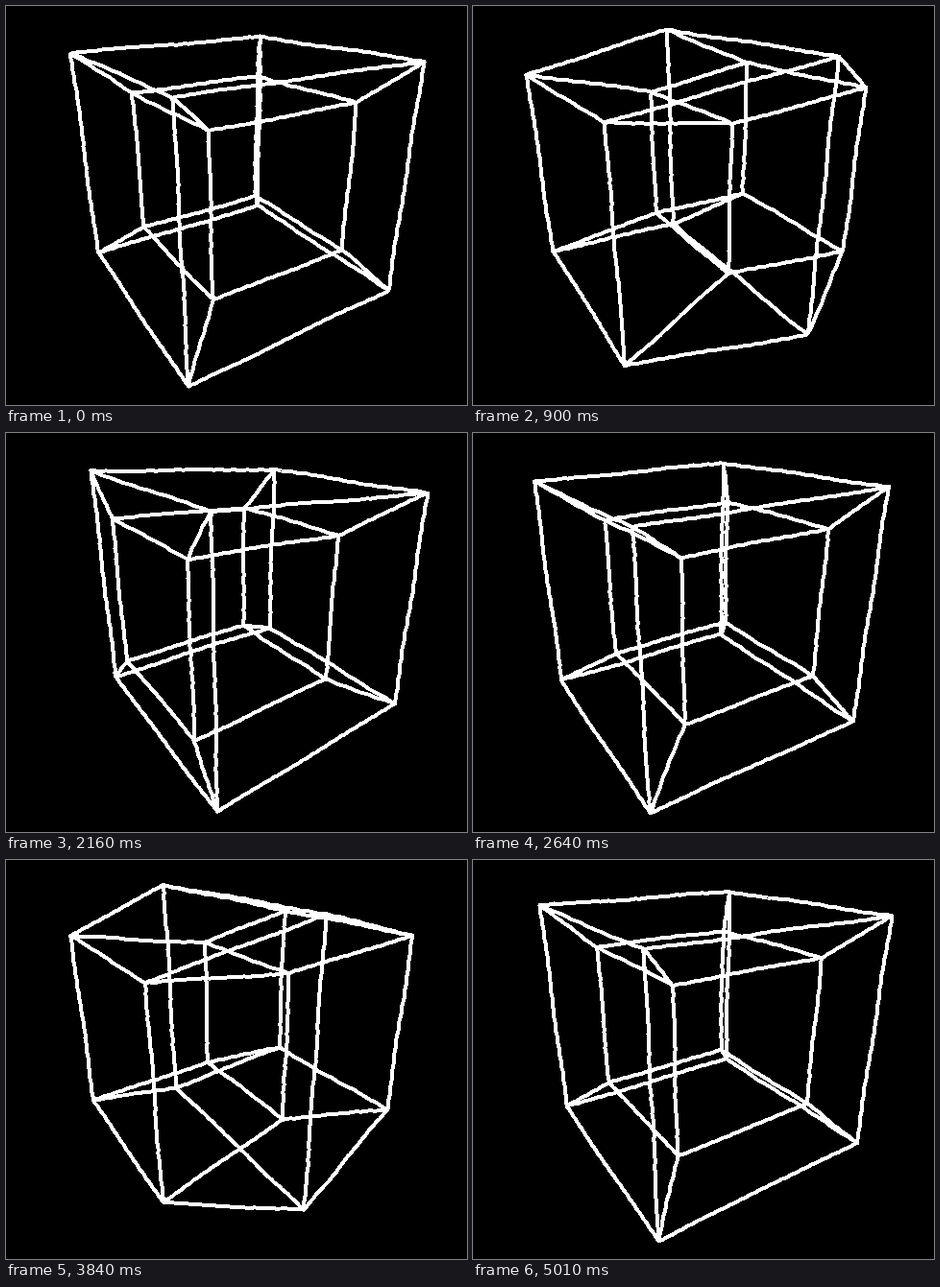
Write an HTML page that moves like this. It is 480 px wide and 416 px high and loops after 5.04 s.

```html
<!DOCTYPE html>
<html lang="en">
<head>
<meta charset="utf-8">
<title>Turning tesseract</title>
<style>
  html, body { margin: 0; width: 100%; height: 100%; overflow: hidden; background: #000; }
  svg { display: block; width: 100%; height: 100%; }
  path {
    fill: none; stroke: #fff; stroke-width: 4;
    stroke-linecap: round; stroke-linejoin: round;
    shape-rendering: crispEdges;
  }
</style>
</head>
<body>
<svg viewBox="0 0 480 416"><path id="wire"/></svg>
<script>
const wire = document.getElementById('wire');
const { sin, cos, PI, SQRT2 } = Math;
const rad = deg => deg * PI / 180;

const QUARTER = 2520;             // ms per quarter turn, after which the shape repeats
const STEPS = 56;                 // poses per quarter turn
const START = rad(-42.9);
const CENTER = { x: 239.5, y: 174 };
const SIZE = 95, DEPTH = 0.201;   // screen scale and perspective strength
const PITCH = rad(22.4), YAW = rad(33);

// View axes: screen x, screen y, depth
const view = (x, y, z) => [x * SIZE, y * SIZE, z * DEPTH];
const axisX = view(-cos(YAW), sin(PITCH) * sin(YAW), -cos(PITCH) * sin(YAW));
const axisY = view(0, -cos(PITCH), -sin(PITCH));
const axisZ = view(-sin(YAW), -sin(PITCH) * cos(YAW), cos(PITCH) * cos(YAW));

// The fourth dimension only changes depth
function project(x, y, z, w) {
  const [px, py, pd] = [0, 1, 2].map(i => x * axisX[i] + y * axisY[i] + z * axisZ[i]);
  const depth = 1 + pd + w * DEPTH;
  return { x: CENTER.x + px / depth, y: CENTER.y + py / depth };
}

// Vertex id = ring * 4 + corner; the rings differ in y and z
const edges = [];
for (let k = 0; k < 4; k++) {
  for (let ring = 0; ring < 4; ring++) edges.push([ring * 4 + k, ring * 4 + (k + 1) % 4]);
  for (const [a, b] of [[0, 1], [2, 3], [0, 2], [1, 3]]) edges.push([a * 4 + k, b * 4 + k]);
}

function vertices(angle) {
  return Array.from({ length: 16 }, (_, id) => {
    const ring = id >> 2, turn = angle + (id & 3) * PI / 2;
    return project(SQRT2 * cos(turn), ring & 1 ? -1 : 1, ring & 2 ? -1 : 1, SQRT2 * sin(turn));
  });
}

function hash(n) {
  const v = sin(n * 127.1 + 11.7) * 43758.5453;
  return v - Math.floor(v);
}

// Hand-drawn wobble: a smooth field that changes with every pose
function wobble(seed) {
  const ph = Array.from({ length: 4 }, (_, i) => 2 * PI * hash(seed * 4 + i));
  return ({ x, y }) => ({
    x: x + 0.6 * sin(0.05 * y - 0.03 * x + ph[0]) + 0.4 * sin(0.43 * y + 0.31 * x + ph[1]),
    y: y + 0.6 * sin(0.05 * x + 0.03 * y + ph[2]) + 0.4 * sin(0.43 * x - 0.31 * y + ph[3])
  });
}

function line(a, b, bend) {
  const n = Math.max(1, Math.ceil(Math.hypot(b.x - a.x, b.y - a.y) / 4));
  let d = '';
  for (let i = 0; i <= n; i++) {
    const t = i / n;
    const p = bend({ x: a.x + (b.x - a.x) * t, y: a.y + (b.y - a.y) * t });
    d += (i ? 'L' : 'M') + p.x.toFixed(1) + ' ' + p.y.toFixed(1);
  }
  return d;
}

let shown = -1;
function draw(ms) {
  const step = Math.floor((ms % QUARTER) / QUARTER * STEPS);
  if (step === shown) return;
  shown = step;
  const points = vertices(START + step / STEPS * PI / 2);
  const bend = wobble(step);
  wire.setAttribute('d', edges.map(([a, b]) => line(points[a], points[b], bend)).join(''));
}

const begin = performance.now();
function tick() {
  draw(performance.now() - begin);
  requestAnimationFrame(tick);
}
tick();
</script>
</body>
</html>
```
